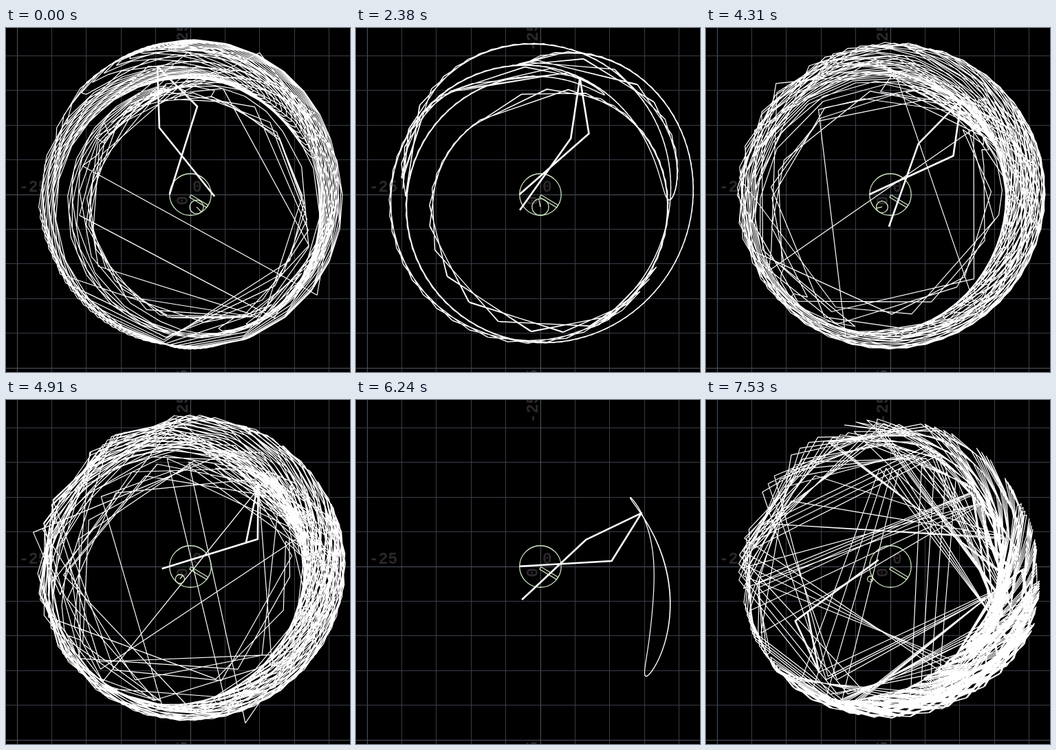
Write an HTML page with a canvas that moves like this. It is 500 by 500 pixels and loops after 8000 ms.

```html
<!DOCTYPE html>
<html>
<head>
<meta charset="utf-8">
<style>
html, body { margin: 0; width: 100%; height: 100%; overflow: hidden; background: #000; }
canvas { display: block; width: 500px; height: 500px; }
</style>
</head>
<body>
<canvas id="stage" width="500" height="500"></canvas>
<script>
const ctx = document.getElementById('stage').getContext('2d');
const LOOP = 8000, RAD = Math.PI / 180;
const UNIT = 10.08, OX = 268, OY = 242;
const R = 3, GEAR_Y = 1.8;               // ring and gear offset, in units
const STEP = 0.1, COUNT = 1000;          // radians per step of the ring
const RING_START = -150 * RAD, GEAR_START = -95 * RAD;
// start ms, gear offset x in units
const poses = [
  [0, 0.9], [460, 0.7], [1060, 0.5], [1730, 0.3], [2380, 0], [3060, -0.5], [3650, -0.9],
  [4310, -1.2], [4910, -1.5], [5650, -2], [6240, -2.4], [6920, -2.7], [7530, -2.9]
];

function polar(p, r, t) {
  return { x: p.x + r * Math.cos(t), y: p.y + r * Math.sin(t) };
}
// Third corner of a triangle on segment a-b; side picks the half plane.
function corner(a, b, ra, rb, side) {
  const dx = b.x - a.x, dy = b.y - a.y, d = Math.hypot(dx, dy);
  const cos = (ra * ra + d * d - rb * rb) / (2 * ra * d);
  const t = Math.atan2(dy, dx) + side * Math.acos(Math.max(-1, Math.min(1, cos)));
  return polar(a, ra, t);
}
function extend(a, b, len) {
  return polar(a, len, Math.atan2(b.y - a.y, b.x - a.x));
}
// Scissor arms on two cranks, closed by two links at the pen.
function linkage(t, ratio, gear) {
  const a = polar({ x: OX, y: OY }, R * UNIT, -RING_START - t);
  const b = polar(gear, R * UNIT, -GEAR_START - t * ratio);
  const pivot = corner(a, b, 59, 76, -1);
  const ea = extend(a, pivot, 134), eb = extend(b, pivot, 128);
  return { a, ea, pen: corner(ea, eb, 82, 89, 1), eb, b };
}

function path(points, color, width) {
  ctx.strokeStyle = color;
  ctx.lineWidth = width;
  ctx.beginPath();
  points.forEach(p => ctx.lineTo(p.x, p.y));
  ctx.stroke();
}
function ring(p, r) {
  ctx.strokeStyle = '#cfe8c6';
  ctx.lineWidth = 1.3;
  ctx.beginPath();
  ctx.arc(p.x, p.y, r, 0, 7);
  ctx.stroke();
}

function grid() {
  ctx.fillStyle = '#000';
  ctx.fillRect(0, 0, 500, 500);
  const shade = n => n % 5 ? '#3a3d48' : '#4f5460';
  for (let i = -5; i <= 5; i++) {
    const x = Math.floor(OX + i * 5 * UNIT) + 0.5;
    const y = Math.floor(OY + i * 5 * UNIT) + 0.5;
    path([{ x, y: 0 }, { x, y: 500 }], shade(i), 1);
    path([{ x: 0, y }, { x: 500, y }], shade(i), 1);
  }
  ctx.font = 'bold 23px "Liberation Mono", monospace';
  ctx.fillStyle = '#2b272a';
  for (const n of [-25, 0, 25]) {
    const at = n * UNIT;
    ctx.textAlign = 'left';
    ctx.fillText(n, OX + at + 3, 238);
    ctx.save();
    ctx.translate(264, OY + at + 2);
    ctx.rotate(-Math.PI / 2);
    ctx.textAlign = 'right';
    ctx.fillText(n, 0, 0);
    ctx.restore();
  }
}

function draw(i) {
  const gx = poses[i][1];
  const gear = { x: OX + gx * UNIT, y: OY + GEAR_Y * UNIT };
  const r = R - Math.hypot(gx, GEAR_Y);
  const ratio = Math.abs(r) < 0.01 ? 0 : R / r;
  const end = COUNT * STEP;
  grid();

  const trace = [];
  for (let k = 0; k <= COUNT; k++) trace.push(linkage(k * STEP, ratio, gear).pen);
  ctx.lineJoin = 'bevel';
  path(trace, '#fff', 1.2);

  ring({ x: OX, y: OY }, R * UNIT);
  if (ratio) {
    const size = Math.abs(r) * UNIT;
    const turn = (76 + 3 * i) * RAD - GEAR_START - end * ratio;
    ring(gear, size);
    path([gear, polar(gear, size, turn)], '#e6eccb', 1.3);
  }
  ctx.save();
  ctx.translate(OX, OY);
  ctx.rotate(31 * RAD);
  ctx.strokeStyle = '#cfe8c6';
  ctx.lineWidth = 1.2;
  ctx.strokeRect(1, 0, 29, 4);
  ctx.restore();

  const m = linkage(end, ratio, gear);
  ctx.lineJoin = 'round';
  path([m.a, m.ea, m.pen, m.eb, m.b], '#fff', 2.6);
}

let shown = -1;
function tick(now) {
  const t = now % LOOP;
  const i = poses.filter(p => p[0] <= t).length - 1;
  if (i !== shown) draw(shown = i);
  requestAnimationFrame(tick);
}
tick(0);
</script>
</body>
</html>
```
